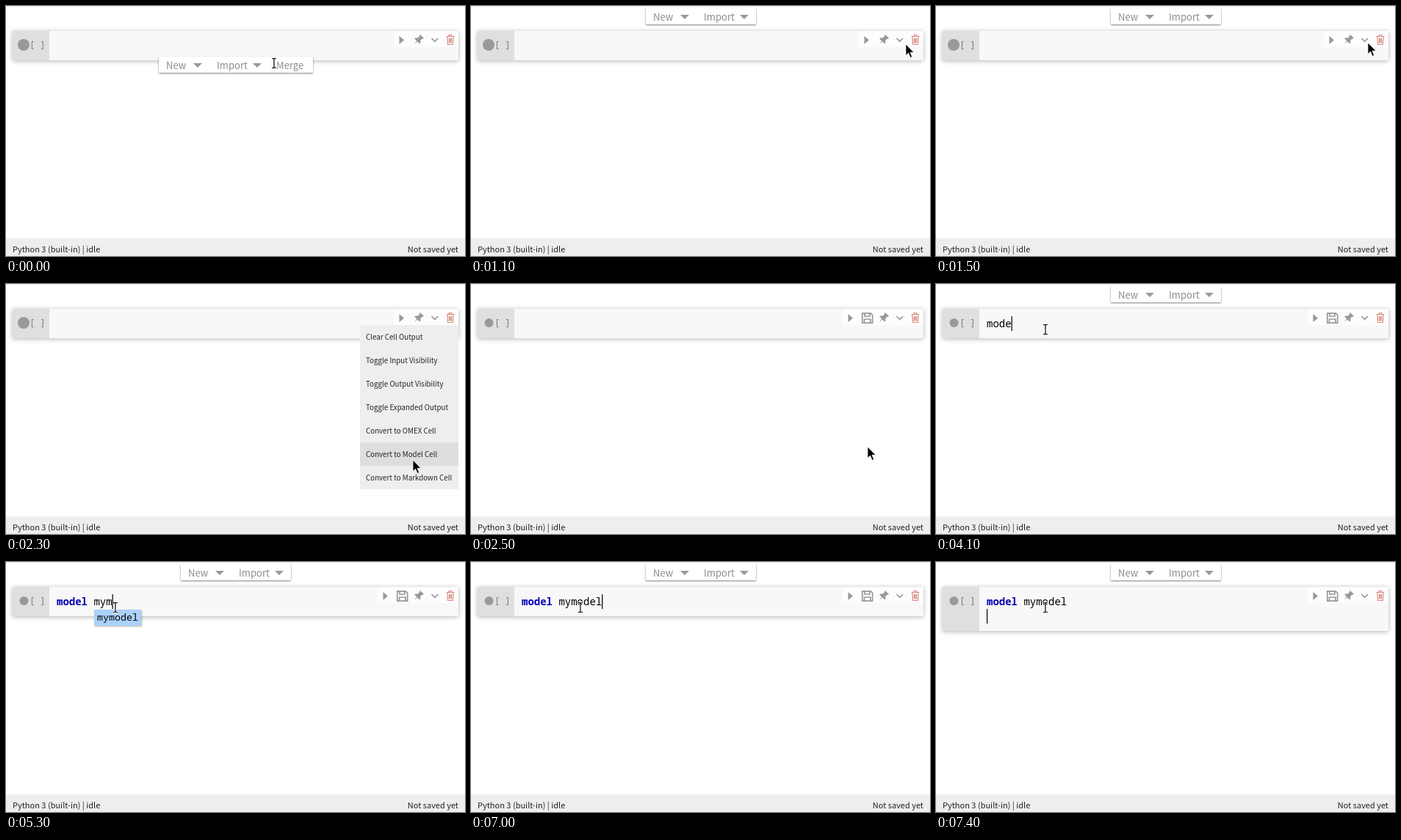
Write an HTML page that moves like this. It is 625 px wide and 341 px high and loops after 8 s.

```html
<!DOCTYPE html>
<html lang="en">
<head>
<meta charset="utf-8">
<title>Notebook cell</title>
<style>
html, body { margin: 0; width: 100%; height: 100%; overflow: hidden; background: #fff; }
svg { display: block; width: 625px; height: 341px; }
text { font-family: "Noto Sans CJK JP", "Noto Sans CJK SC", "Noto Sans", sans-serif; white-space: pre; }
.status { font-size: 11px; fill: #222; }
.item { font-size: 9.75px; fill: #222; }
.bar text { font-size: 13.1px; font-weight: 300; fill: #8c8c8c; }
.bar path, .icon { fill: #999; }
.bar rect { fill: #fff; filter: drop-shadow(0 1px 1px rgba(0,0,0,.5)); }
.code { font: 14px "Noto Sans Mono", "DejaVu Sans Mono", monospace; }
.key { font-weight: 700; fill: #0000b4; }
.line { fill: none; stroke: #999; stroke-width: 1.7; }
#cell { filter: drop-shadow(0 1px 3px rgba(0,0,0,.3)); }
#hint { filter: drop-shadow(1px 1px 1px rgba(0,0,0,.3)); }
#hint text { font-size: 13.33px; }
</style>
</head>
<body>
<svg viewBox="0 0 625 341">
  <rect width="625" height="1" fill="#e9e9e9"/>
  <g id="cell">
    <rect class="grow" x="9" y="34" width="607" height="40" fill="#f8f8f8"/>
    <rect class="grow" x="9" y="34" width="50" height="40" fill="#e0dee1"/>
  </g>
  <circle id="kind" cy="53" fill="#999"/>
  <text class="code" x="32" y="57" style="font-size:12px" fill="#777">[ ]</text>

  <rect id="tools" y="34" height="22" fill="#fdfdfd"/>
  <path id="run" class="icon" d="M535.5 41l6.5 5.5-6.5 5.5z"/>
  <g id="save" class="line">
    <path d="M532.8 39.8h11.4l2.5 2.5v10.9h-13.9z"/>
    <path d="M536 40v4h7v-4M535.5 53v-5h8.5v5"/>
  </g>
  <path class="icon" transform="translate(561.5 46.3) rotate(45)" d="M-3.5-7h7v1.6h-1v4l2.5 2.4v1.5h-4.3l-.7 5-.7-5h-4.3v-1.5l2.5-2.4v-4h-1z"/>
  <path class="line" d="M579.5 44l4.3 4.3 4.3-4.3"/>
  <g fill="none" stroke="#d98b80" stroke-width="1.2">
    <path d="M599.5 41.5h11M603 41v-1.5h4V41M601 42l.6 10.5h6.8L609 42M603.5 44v6.5M605 44v6.5M606.5 44v6.5"/>
  </g>

  <text class="code" x="69" y="59"><tspan id="word"></tspan><tspan id="rest"></tspan></text>
  <rect id="caret" width="1.2" height="20"/>
  <g id="hint">
    <rect y="65" height="22" fill="#abd1fb"/>
    <text class="code" y="80"></text>
  </g>

  <g id="low" class="bar" transform="translate(208 69)">
    <rect width="210" height="22"/>
    <text x="10" y="17">New</text><path d="M47 9h12l-6 6z"/>
    <text x="79" y="17">Import</text><path d="M128 9h12l-6 6z"/>
    <text x="160" y="17">Merge</text>
  </g>
  <g id="top" class="bar" transform="translate(238 3)">
    <rect width="150" height="22"/>
    <text x="10" y="17">New</text><path d="M47 9h12l-6 6z"/>
    <text x="79" y="17">Import</text><path d="M128 9h12l-6 6z"/>
  </g>

  <g id="menu">
    <rect x="482" y="56" width="134" height="224" fill="#eee"/>
    <rect id="hover" x="482" width="134" height="32" fill="#dfdde0"/>
  </g>

  <rect y="317" width="625" height="24" fill="#eee"/>
  <text class="status" x="9" y="336">Python 3 (built-in) | idle</text>
  <text class="status" x="616" y="336" text-anchor="end">Not saved yet</text>

  <path id="arrow" d="M0 0v15.5l3.6-3.3 2.6 6.2 2.5-1.1-2.6-6h4.9z" stroke="#fff" stroke-width=".8"/>
  <g id="beam" fill="none">
    <path d="M-3-6.5h2l1 1 1-1h2M-3 6.5h2l1-1 1 1h2M0-5.5v11" stroke="#fff" stroke-width="3"/>
    <path d="M-3-6.5h2l1 1 1-1h2M-3 6.5h2l1-1 1 1h2M0-5.5v11" stroke="#000" stroke-width="1.2"/>
  </g>
</svg>
<script>
const $ = id => document.getElementById(id);
const LOOP = 8000, CHAR = 8.4, LEFT = 69;

["Clear Cell Output", "Toggle Input Visibility", "Toggle Output Visibility",
 "Toggle Expanded Output", "Convert to OMEX Cell", "Convert to Model Cell",
 "Convert to Markdown Cell"].forEach((label, i) => {
  const text = document.createElementNS("http://www.w3.org/2000/svg", "text");
  text.setAttribute("class", "item");
  set(text, { x: 490, y: 76 + 32 * i });
  text.textContent = label;
  $("menu").append(text);
});

// Each track lists [start time, ...values]; values hold until the next entry.
const pointer = [
  [0, 365, 78], [300, 440, 72], [400, 540, 62], [500, 595, 55], [700, 598, 51],
  [800, 599, 46], [1100, 592, 52], [1500, 588, 50], [1600, 585, 47], [1900, 583, 62],
  [2000, 576, 105], [2100, 567, 160], [2200, 558, 212], [2300, 554, 240],
  [2500, 540, 222], [2600, 440, 152], [2700, 280, 92], [2800, 172, 64],
  [3000, 152, 63], [3100, 149, 62]
];
const lowFade = [[0, 1], [300, .7], [400, .3], [500, 0]];
const topFade = [[0, 0], [700, .5], [800, 1], [2000, .5], [2100, 0], [3000, .5], [3100, 1]];
const typed = [
  [0, 0], [3700, 1], [3900, 2], [4100, 4], [4300, 5], [4700, 6], [4900, 7],
  [5000, 8], [5300, 9], [5500, 11], [5700, 12], [5900, 13]
];

function set(el, attrs) {
  for (const name in attrs) el.setAttribute(name, attrs[name]);
}
function at(track, t) {
  return track.findLast(entry => entry[0] <= t).slice(1);
}
function show(id, on) {
  $(id).style.display = on ? "" : "none";
}
const within = (t, from, to) => t >= from && t < to;

function draw(t) {
  const [x, y] = at(pointer, t), [count] = at(typed, t);
  const model = t >= 2500, newline = t >= 7400;

  set($("kind"), model ? { cx: 24.5, r: 6 } : { cx: 24, r: 8 });
  const toolsLeft = model ? 506 : 528;
  set($("tools"), { x: toolsLeft, width: 616 - toolsLeft });
  set($("run"), { transform: `translate(${toolsLeft - 528})` });
  show("save", model);
  document.querySelectorAll(".grow").forEach(el => set(el, { height: newline ? 60 : 40 }));

  $("low").style.opacity = at(lowFade, t)[0];
  $("top").style.opacity = at(topFade, t)[0];

  show("menu", within(t, 1700, 2500));
  const row = Math.floor((y - 56) / 32);
  show("hover", row >= 0);
  set($("hover"), { y: 56 + 32 * row });

  const text = "model mymodel".slice(0, count);
  $("word").textContent = text.slice(0, 5);
  set($("word"), { class: count >= 5 ? "key" : "" });
  $("rest").textContent = text.slice(5);
  show("caret", t >= 3000);
  set($("caret"), { x: newline ? LEFT : LEFT + count * CHAR, y: newline ? 64 : 44 });

  const first = within(t, 3900, 4100);
  show("hint", first || within(t, 5300, 7000));
  const hint = first ? "model" : "mymodel", hintX = first ? LEFT : 120;
  const [box, label] = $("hint").children;
  set(box, { x: hintX, width: 8 * hint.length + 8 });
  set(label, { x: hintX + 4 });
  label.textContent = hint;

  const beam = x < 506 && y < 80;
  show("beam", beam);
  show("arrow", !beam);
  set($(beam ? "beam" : "arrow"), { transform: `translate(${x} ${y})` });
}

function frame() {
  draw(performance.now() % LOOP);
  requestAnimationFrame(frame);
}
frame();
</script>
</body>
</html>
```
